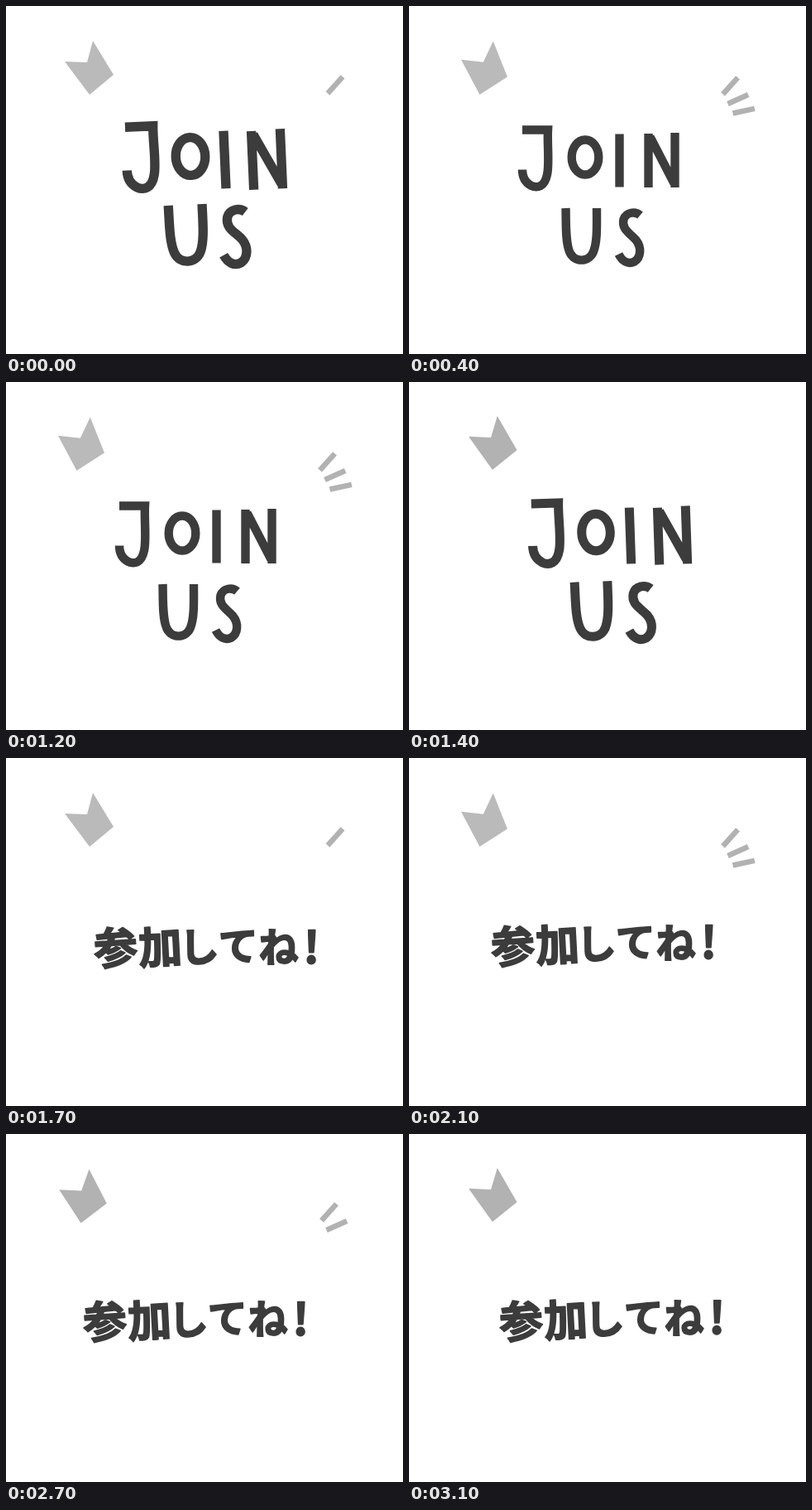
An HTML page with a canvas for the animation above (3.4 s loop, 480 by 420 pixels).

```html
<!DOCTYPE html>
<html lang="ja">
<head>
<meta charset="utf-8">
<style>
html, body { margin: 0; width: 100%; height: 100%; overflow: hidden; background: #fff; }
canvas { display: block; }
</style>
</head>
<body>
<canvas id="stage" width="480" height="420"></canvas>
<script>
const ctx = document.getElementById('stage').getContext('2d');
const INK = '#3c3c3d', LIGHT = '#bababa', GREY = '#b2b2b2';
const HALF = 1700, STEP = 200;
const rad = deg => deg * Math.PI / 180;

// Four wobble poses, shared by the lettering and the greeting
const poses = [
  { tag: { dx: 0, dy: 0, lean: 0, tilt: 0, fill: LIGHT },
    fan: { count: 1, dx: 9.5, dy: -1 },
    sign: { dx: 0, dy: 0, turn: -2.5, size: 1.09 },
    line: { dx: 0, y: 228, slope: 0 } },
  { tag: { dx: -7.5, dy: 0.5, lean: -0.09, tilt: 0.01, fill: GREY },
    fan: { count: 2, dx: 2, dy: -2 },
    sign: { dx: -8, dy: 0, turn: -1, size: 1.03 },
    line: { dx: -13, y: 224, slope: -0.01 } },
  { tag: { dx: -9.5, dy: 0, lean: -0.19, tilt: 0.08, fill: LIGHT },
    fan: { count: 3, dx: 0, dy: 0 },
    sign: { dx: -10, dy: 1, turn: 0, size: 1 },
    line: { dx: -7, y: 224, slope: -0.018 } },
  { tag: { dx: 0.8, dy: -1, lean: -0.03, tilt: 0.01, fill: GREY },
    fan: { count: 0, dx: 0, dy: 0 },
    sign: { dx: 3, dy: 0, turn: -2, size: 1.06 },
    line: { dx: 3, y: 223, slope: -0.016 } }
];

// Brush letters, each drawn around its own centre
const letter = (x, y, d) => ({ x, y, path: new Path2D(d) });
const letters = [
  letter(163, 182.5, 'M-16-34H15C14-17 17 7 14 20C11 35 2 37-6 33C-13 29-16 22-16 14'),
  letter(223, 181.5, 'M-16.3 0a16.3 21 0 1 0 32.6 0a16.3 21 0 1 0-32.6 0Z'),
  letter(264.5, 185.5, 'M0-32V32'),
  letter(315.5, 185, 'M-16 33V-32M16 33V-33M-14-28L15 28'),
  letter(218.5, 277, 'M-19-34C-18.5-14-19.5 6-14.5 18.5C-9 32 9 32 14.5 18.5C19.5 6 18.5-14 18.5-34'),
  letter(277.5, 279.5, 'M12-28C6-33-5-32-8-23C-11-11 0-6 7 2C14 11 13 23 5 28C-3 32-10 27-14 19')
];

const tagShape = new Path2D('M5-33L30 8L1 32L-29-8L-2-7Z');

const greeting = '参加してね!';
const centres = [132, 185, 237, 280, 330, 369];
const glyphSize = ch => /[ぁ-ん]/.test(ch) ? 48 : 53;

function drawTag({ dx, dy, lean, tilt, fill }) {
  ctx.save();
  ctx.transform(1, tilt, lean, 1, 100 + dx, 75 + dy);
  ctx.fillStyle = fill;
  ctx.fill(tagShape);
  ctx.restore();
}

// Rays fan out, each at half the angle of the one above
function drawFan({ count, dx, dy }) {
  ctx.strokeStyle = GREY;
  ctx.lineWidth = 6.5;
  for (let i = 0; i < count; i++) {
    const x = 379.5 + 6 * i + dx, y = 106.5 + 11.5 * i + dy;
    const angle = rad(-48 / 2 ** i);
    ctx.beginPath();
    ctx.moveTo(x, y);
    ctx.lineTo(x + 27 * Math.cos(angle), y + 27 * Math.sin(angle));
    ctx.stroke();
  }
}

function drawSign({ dx, dy, turn, size }) {
  ctx.lineWidth = 10.4;
  for (const { x, y, path } of letters) {
    ctx.save();
    ctx.translate(x + dx, y + dy);
    ctx.rotate(rad(turn));
    ctx.scale(size, size);
    ctx.stroke(path);
    ctx.restore();
  }
}

// Each glyph is centred on its visible ink and turned a little more than the last
function drawGreeting({ dx, y, slope }) {
  ctx.lineWidth = 1.8;
  ctx.lineJoin = 'round';
  [...greeting].forEach((ch, i) => {
    ctx.font = `900 ${glyphSize(ch)}px "Noto Sans CJK JP", "Noto Sans CJK", sans-serif`;
    const m = ctx.measureText(ch);
    const left = (m.actualBoundingBoxLeft - m.actualBoundingBoxRight) / 2;
    const base = (m.actualBoundingBoxAscent - m.actualBoundingBoxDescent) / 2;
    ctx.save();
    ctx.translate(centres[i] + dx, y + slope * (centres[i] - 250));
    ctx.rotate(rad(i - 4));
    ctx.fillText(ch, left, base);
    ctx.strokeText(ch, left, base);
    ctx.restore();
  });
}

function draw(time) {
  const t = time % (2 * HALF);
  const step = Math.min(7, Math.floor(t % HALF / STEP));
  const pose = poses[step % poses.length];
  ctx.fillStyle = '#fff';
  ctx.fillRect(0, 0, 480, 420);
  drawTag(pose.tag);
  drawFan(pose.fan);
  ctx.fillStyle = ctx.strokeStyle = INK;
  ctx.lineJoin = 'miter';
  if (t < HALF) drawSign(pose.sign);
  else drawGreeting(pose.line);
}

const start = performance.now();
function tick() {
  draw(performance.now() - start);
  requestAnimationFrame(tick);
}
tick();
</script>
</body>
</html>
```
